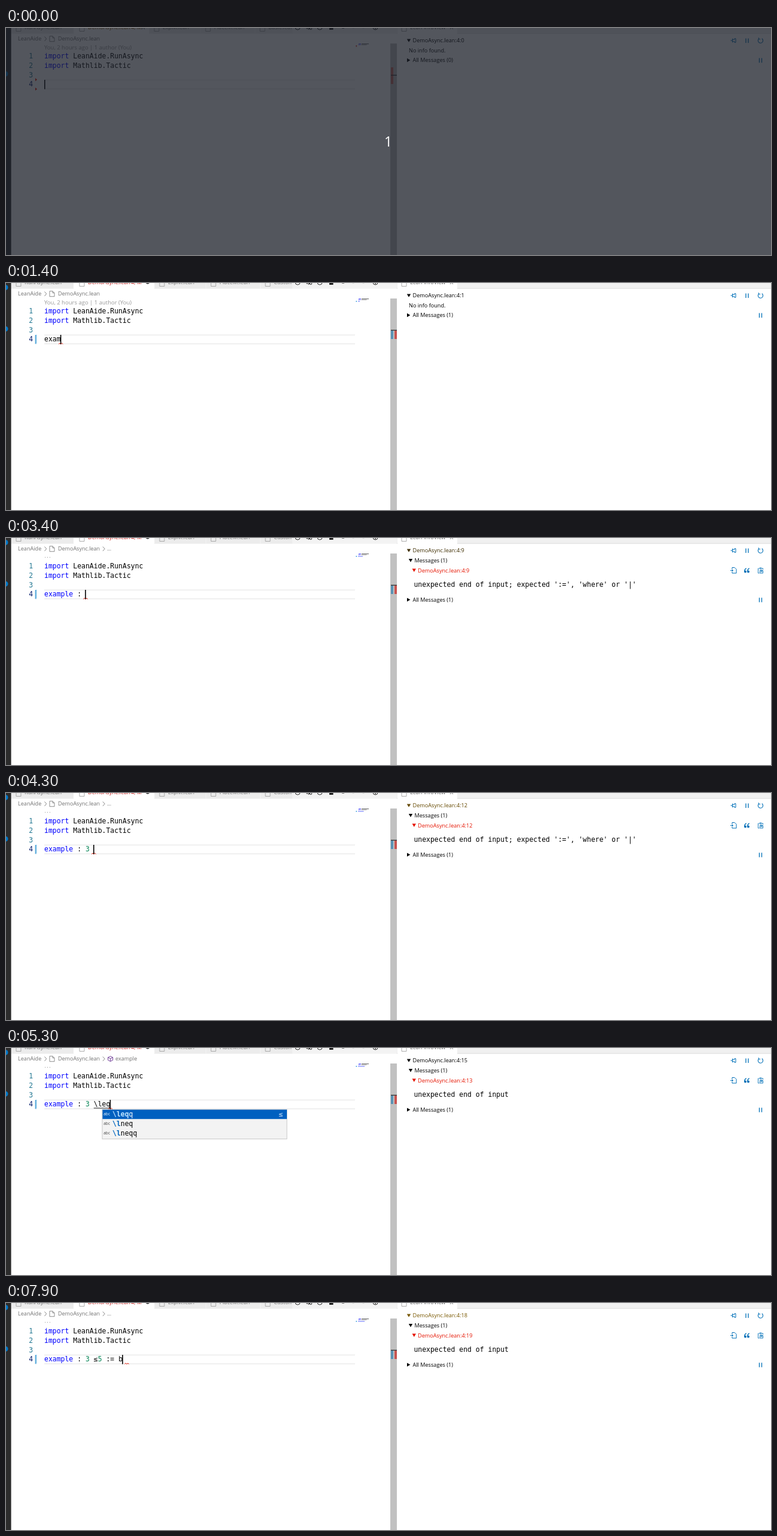
Recreate the animation shown at these times as an HTML page. Size 1280 by 381 pixels, loop 8000 ms.

```html
<!DOCTYPE html>
<html lang="en">
<head>
<meta charset="utf-8">
<title>Lean editor</title>
<style>
  html, body { margin: 0; width: 100%; height: 100%; overflow: hidden; background: #fff; }
  svg { display: block; width: 1280px; height: 381px; }
  text { white-space: pre; font-family: "Open Sans", "Noto Sans", sans-serif; font-size: 9.15px; }
  .code { font-family: "DejaVu Sans Mono", monospace; font-size: 11.46px; }
</style>
</head>
<body>
<svg id="stage" viewBox="0 0 1280 381"></svg>
<script>
const LOOP = 8000, TICK = 100;
const CH = 6.9, ROW = 15.75, LEFT = 64;
const BLUE = '#0000ff', GREEN = '#098658', RED = '#e51400', LINK = '#0070b8';
const LONG = "unexpected end of input; expected ':=', 'where' or '|'";
const SHORT = 'unexpected end of input';
const BARE = "expected ':=', 'where' or '|'";
const WORDS = 'lambda langle lceil ldots le leftarrow leftrightarrow leqq lfloor lightning ll ltimes'.split(' ');

// Each step changes only the listed properties.
const steps = [
  [0, { line: '', caret: 1, veil: 1, col: 0, all: 0, crumb: '', lens: 1, list: null, squiggle: -1 }],
  [100, { veil: 0 }],
  [300, { caret: 0 }],
  [800, { line: 'e', caret: 1, dirty: 1 }],
  [1000, { line: 'ex', col: 1 }],
  [1200, { line: 'exa', error: 1, all: 1, squiggle: 0 }],
  [1400, { line: 'exam' }],
  [1600, { line: 'examp' }],
  [1800, { line: 'exampl' }],
  [2000, { line: 'example', crumb: '…' }],
  [2200, { line: 'example ' }],
  [2400, { col: 8, at: 8, msg: LONG }],
  [2800, { line: 'example :' }],
  [3000, { line: 'example : ', col: 9, at: 9 }],
  [3200, { lens: 0 }],
  [3500, { line: 'example : 3', col: 10, at: 10 }],
  [3900, { line: 'example : 3 ' }],
  [4100, { col: 12, at: 12 }],
  [4500, { line: 'example : 3 \\' }],
  [4700, { line: 'example : 3 \\l', col: 13, at: 13, msg: SHORT, crumb: 'example', list: WORDS }],
  [5100, { line: 'example : 3 \\le', col: 14, list: WORDS.filter(w => w.startsWith('le')) }],
  [5300, { line: 'example : 3 \\leq', col: 15, list: ['leqq', 'lneq', 'lneqq'] }],
  [5600, { line: 'example : 3 ≤5', col: 14, list: null, squiggle: 1 }],
  [5800, { line: 'example : 3 ≤5 ', at: 16, msg: LONG }],
  [6100, { col: 15 }],
  [6500, { line: 'example : 3 ≤5 :' }],
  [6700, { col: 16, at: 15, msg: BARE }],
  [7000, { line: 'example : 3 ≤5 :=', crumb: '…' }],
  [7200, { line: 'example : 3 ≤5 := ', msg: SHORT }],
  [7400, { col: 18, at: 19 }],
  [7700, { line: 'example : 3 ≤5 := b' }]
];

// Gold glow of the panel heading while Lean is busy: [ms, amount]
const glow = [
  [0, 0], [2400, 0], [2600, .25], [3000, .9], [3500, .1], [4000, .9], [4300, .42], [4700, 0],
  [5000, 0], [5200, .4], [5300, 0], [5600, 0], [6200, 1], [6800, 0], [6900, 0],
  [7200, .6], [7400, 0], [7700, 0], [7900, .5], [8000, .75]
];

const rect = (x, y, w, h, fill, more = '') =>
  `<rect x="${x}" y="${y}" width="${w}" height="${h}" fill="${fill}" ${more}/>`;
const path = (d, color, width = 1, fill = 'none') =>
  `<path d="${d}" stroke="${color}" stroke-width="${width}" fill="${fill}"/>`;
const solid = (d, color) => `<path d="${d}" fill="${color}"/>`;
const dot = (x, y, r, fill, more = '') => `<circle cx="${x}" cy="${y}" r="${r}" fill="${fill}" ${more}/>`;
const text = (x, y, s, fill = '#000', more = '') => `<text x="${x}" y="${y}" fill="${fill}" ${more}>${s}</text>`;
const code = (x, y, s, fill = '#000', more = '') => text(x, y, s, fill, `class="code" ${more}`);
const span = (s, fill, more = '') => `<tspan fill="${fill}" ${more}>${s}</tspan>`;

const baseline = n => 51.2 + (n - 1) * ROW;
const down = (x, y, color) => solid(`M${x} ${y - 2.6}h6.4l-3.2 5.4z`, color);
const right = (x, y, color) => solid(`M${x} ${y - 3.2}v6.4l5.4-3.2z`, color);
const fileIcon = (x, y, color) => path(`M${x} ${y - 4.5}h5l3 3v6h-8zM${x + 5} ${y - 4.5}v3h3`, color, .8);
const chevron = x => path(`M${x} 14.5l3.2 3.7l-3.2 3.7`, '#777', .9);
const pause = (x, y) => path(`M${x - 2} ${y - 3.8}v7.6m4 0v-7.6`, LINK, 1.3);

function stateAt(t) {
  const s = {};
  for (const [at, change] of steps) if (at <= t) Object.assign(s, change);
  return s;
}

function glowAt(t) {
  const i = glow.findIndex(([at]) => at > t);
  const [t0, a] = glow[i - 1], [t1, b] = glow[i];
  return a + (b - a) * (t - t0) / (t1 - t0);
}

function tabs(s) {
  const shift = s.dirty ? 9 : 0;
  const tint = s.error ? '#c8201c' : '#895503';
  let out = rect(9, 0, 645, 9.5, '#f3f3f3') + rect(9, 0, 470, 9.5, '#ececec')
    + rect(113, 0, 126 + shift, 10, '#fff')
    + fileIcon(17, 1, '#999') + text(31, 2, 'RunAsync.lean', '#666')
    + fileIcon(123, 1, '#999') + text(137, 2, 'DemoAsync.lean', tint) + text(209, 2, '4, M', tint)
    + (s.dirty ? dot(237, -1.5, 3.2, '#444') : path('M227 -4l5 6m0 -6l-5 6', '#555'));
  [[248, 'ExpM.lean'], [334, 'PlaceM.lean'], [425, s.dirty ? 'Custom' : 'Basic.lean']].forEach(([x, name]) => {
    out += rect(x + shift - 9, 0, 1, 9.5, '#f3f3f3') + fileIcon(x + shift, 1, '#999') + text(x + shift + 14, 2, name, '#777');
  });
  out += rect(479, 0, 175, 9.5, '#f3f3f3');
  for (const x of [488, 525, 618]) out += dot(x, -1, 4, 'none', 'stroke="#333"');
  out += path('M503 -2v3h5m-2 -2l2 2l-2 2', '#333') + dot(510, 1, 1.6, 'none', 'stroke="#333"')
    + rect(541, -3, 6.5, 6, '#222') + dot(564, -2, 3, '#666')
    + dot(581, -2, 2.5, '#bbb') + dot(598, -2, 2.5, '#bbb') + rect(617.4, -1, 1.2, 3, '#333');
  return out + rect(654, 0, 626, 9.5, '#f0f0f0') + rect(654, 8.5, 626, 1.5, '#e6e6e6')
    + rect(655, 0, 100, 10, '#fff') + fileIcon(662, 1, '#999')
    + text(676, 2, 'Lean InfoView', '#666') + path('M743 -4l5 6m0 -6l-5 6', '#777');
}

function breadcrumb(s) {
  let out = text(20, 21.3, 'LeanAide', '#717171') + chevron(64.5) + fileIcon(73, 18.2, '#717171')
    + text(87, 21.3, 'DemoAsync.lean', '#717171', 'style="font-size:9px"');
  if (s.crumb) out += chevron(162);
  if (s.crumb === '…') out += text(169, 21.3, '…', '#717171');
  if (s.crumb === 'example')
    out += path('M174.7 13.8l4 2v4.6l-4 2l-4-2v-4.6zM170.7 15.8l4 2l4-2M174.7 17.8v4.6', '#652d90', .9)
      + text(183, 21.3, 'example', '#717171');
  return out;
}

function squiggle(x) {
  return path(`M${x - 3.5} 102.6l1.8-1.6l1.8 1.6l1.8-1.6l1.8 1.6`, RED, 1);
}

function typedLine(line) {
  const spans = line.replace(/^example\b|\d|\\\w*/g, m =>
    m === 'example' ? span(m, BLUE) : /\d/.test(m) ? span(m, GREEN) : m);
  const slash = line.indexOf('\\');
  const mark = slash < 0 ? '' : rect(LEFT + slash * CH, 100.4, (line.length - slash) * CH - .6, 1, '#222');
  return code(LEFT, baseline(4), spans) + mark;
}

function editor(s) {
  let out = s.lens
    ? text(LEFT, 35.6, 'You, 2 hours ago | 1 author (You)', '#999', 'style="font-size:9.5px"')
    : text(LEFT + .5, 32.6, '...', '#888', 'letter-spacing="1.4"');
  for (let n = 1; n <= 4; n++)
    out += code(45.2, baseline(n), n, n === 4 ? '#0b216f' : '#237893', 'text-anchor="end"');
  out += code(LEFT, baseline(1), span('import', BLUE) + ' LeanAide.RunAsync')
    + code(LEFT, baseline(2), span('import', BLUE) + ' Mathlib.Tactic')
    + rect(LEFT, 86.6, 520, 1.4, '#eaeaea') + rect(LEFT, 101.4, 520, 1.4, '#eaeaea');

  // change marks in the gutter
  if (s.dirty) {
    out += rect(48.7, 87, 2.4, 15.4, '#8cc4e4');
    for (let y = 87.5; y < 101; y += 2.4) out += path(`M48.7 ${y + 1.6}l2.4-1.6`, '#2090d3', .9);
  } else {
    for (const y of [86.7, 102.5]) out += solid(`M49 ${y - 2.6}v5.2l3-2.6z`, RED);
  }

  out += typedLine(s.line);
  const end = LEFT + s.line.length * CH;
  if (s.squiggle >= 0) out += squiggle(end + s.squiggle * CH);
  if (s.caret) out += rect(end - (s.line ? .8 : 0), 87, 1.6, 15.6, '#000');

  // minimap
  out += rect(590, 26, 4, 1.2, '#6a6aff') + rect(595, 26, 12, 1.2, '#777')
    + rect(589.5, 27.6, 4, 1, '#6a6aff') + rect(594.5, 27.6, 9, 1, '#888');
  out += s.dirty
    ? rect(585.5, 30, 1.6, 1.5, '#2090d3') + rect(589, 30.2, Math.min(s.line.length, 14) * .8, 1.2, '#7c86ff')
    : rect(585.5, 29, 1.6, 2.5, '#e04030');

  // overview ruler
  out += rect(643, 26, 11, 355, '#c1c1c1');
  if (s.dirty) out += rect(644, 79, 4, 15, '#5a93b5');
  else out += rect(644, 66, 4, 28, '#c9685e');
  if (s.error) out += rect(650, 79, 4, 15, '#c85450');
  return out + rect(644, 78.6, 10, 1.3, '#333');
}

function suggestions(s) {
  if (!s.list) return '';
  const typed = s.line.split('\\')[1], h = s.list.length * 15.8 + 2;
  let out = rect(161, 103.3, 309, h, '#f3f3f3', 'stroke="#c8c8c8" stroke-width="1"') + rect(161.5, 103.5, 308.5, 15.7, '#0060c0');
  s.list.forEach((word, i) => {
    const y = 115 + i * 15.8, on = i === 0;
    const n = word.startsWith(typed) ? typed.length : 1;
    out += text(163.2, y - 1.6, 'abc', on ? '#fff' : '#444', 'style="font-size:6.6px"')
      + code(178, y, span('\\' + word.slice(0, n), on ? '#bfe3ff' : '#0066bf', 'font-weight="bold"') + word.slice(n), on ? '#fff' : '#000');
  });
  out += code(456.5, 115, s.list === WORDS ? 'λ' : '≤', '#cfe4f8');
  if (s.list === WORDS) out += rect(463, 119.2, 7, 22, '#b9b9b9');
  return out;
}

function panel(s, g) {
  const tint = `rgb(${242 * g | 0},${176 * g | 0},0)`;
  let out = down(670.8, 21, tint) + text(680.5, 24.3, 'DemoAsync.lean:4:' + s.col, tint)
    + path('M1212.5 21h3m0-3.2v6.4m0-5h3.5v-1.4h2v6.4h-2v-1.4h-3.5', LINK)
    + pause(1240, 21.3)
    + path('M1259.6 18.2a4.1 4.1 0 1 0 5.2-.4M1259.4 16.2v2.6h2.8', LINK, 1.1);
  let y = 54;
  if (s.msg) {
    y = 103.6;
    out += down(673.8, 37.7, '#000') + text(683.5, 41, 'Messages (1)')
      + down(679.6, 54.2, RED) + text(689, 57.5, 'DemoAsync.lean:4:' + s.at, RED)
      + code(682.4, 82.4, s.msg)
      + path('M1215 52v-2.5h4l3 3v6.5h-7v-2M1212 54.5h4.5m-2-2l2 2l-2 2', LINK);
    for (const x of [1235, 1240]) out += dot(x + 2, 56.4, 2, LINK) + path(`M${x + .7} 56.4q0-4.4 3-5.6`, LINK, 1.4);
    out += path('M1259.5 51h-1v8h2M1261 50h3v2h-3zM1265 51h1.5v2M1261.5 54.5h5v4.5h-5zM1264 53v4m-1.5-1.5l1.5 1.5l1.5-1.5', LINK, .9);
  } else {
    out += text(674, 41, 'No info found.');
  }
  return out + right(671, y, '#000') + text(680.5, y + 3.4, `All Messages (${s.all})`) + pause(1262.5, y + .4);
}

function scene(t) {
  const s = stateAt(t);
  return rect(0, 0, 1280, 381, '#fff') + tabs(s) + breadcrumb(s) + editor(s) + suggestions(s) + panel(s, glowAt(t))
    + rect(0, 0, 8.6, 381, '#2c2c2c') + dot(-1, 77, 4.5, '#007acc') + (s.dirty ? dot(-1, 7.5, 4.5, '#007acc') : '')
    + (s.veil ? rect(0, 0, 1280, 381, 'rgb(26,30,39)', 'opacity=".75"')
      + text(639.5, 198.5, '1', '#fff', 'text-anchor="middle" style="font-size:23px"') : '');
}

const stage = document.getElementById('stage');
let shown = -1;
function draw() {
  const t = Math.floor(performance.now() % LOOP / TICK) * TICK;
  if (t !== shown) stage.innerHTML = scene(shown = t);
  requestAnimationFrame(draw);
}
draw();
</script>
</body>
</html>
```
